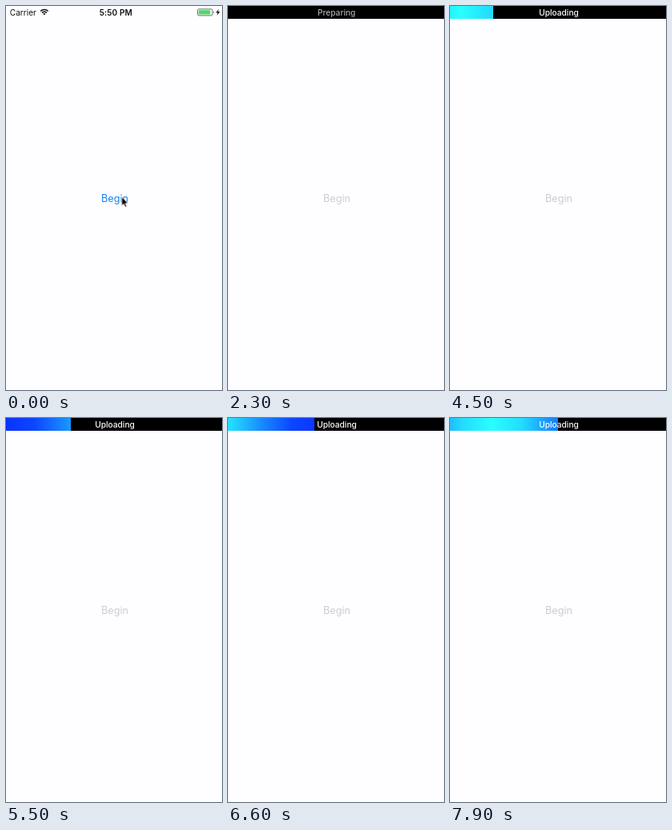
An HTML page for the animation above (8000 ms loop, 270 by 480 pixels).

```html
<!DOCTYPE html>
<html lang="en">
<head>
<meta charset="utf-8">
<title>Status bar progress</title>
<style>
  html, body { margin: 0; width: 100%; height: 100%; overflow: hidden; background: #fefdff; }
  .stage { position: relative; width: 270px; height: 480px; overflow: hidden; }
  svg { position: absolute; left: 0; top: 0; font-family: Inter, Roboto, sans-serif; }

  /* Every part shares one 8 s clock: 1% = 80 ms */
  .begin, .cursor, .strip, .fill, .label { animation: 8s linear infinite both; }

  .begin { font-size: 12.66px; text-anchor: middle; animation-name: disable; }
  .cursor { animation-name: leave; animation-timing-function: step-end; }

  .strip {
    position: absolute; left: 0; top: 0; width: 270px; height: 16px;
    overflow: hidden; background: #000;
    animation-name: drop; animation-timing-function: ease-in-out;
  }
  .fill {
    height: 100%;
    background: linear-gradient(90deg,
      rgb(40 255 255), rgb(35 220 255) 12.5%, rgb(23 139 255) 25%, rgb(13 70 255) 37.5%,
      rgb(10 50 255) 50%, rgb(13 70 255) 62.5%, rgb(23 139 255) 75%, rgb(35 220 255) 87.5%,
      rgb(40 255 255)) 0 0 / 300px 100%;
    animation-name: grow, shimmer;
    animation-timing-function: ease-in-out, linear;
  }
  .label { font-size: 10.2px; font-weight: 500; fill: #fff; text-anchor: middle; }
  .preparing { animation-name: preparing; }
  .uploading { animation-name: uploading; }

  @keyframes disable {
    0%, 1.1% { fill: #1684f2; }
    6.5%, 100% { fill: #cdcccf; }
  }
  @keyframes leave {
    0% { opacity: 1; }
    11.9%, 100% { opacity: 0; }
  }
  @keyframes drop {
    0%, 1.2% { transform: translateY(-17px); }
    7.2%, 100% { transform: none; }
  }
  @keyframes preparing {
    0%, 10.6% { opacity: 0; }
    13.7%, 27% { opacity: 1; }
    32.4%, 100% { opacity: 0; }
  }
  @keyframes uploading {
    0%, 34.3% { opacity: 0; }
    39%, 100% { opacity: 1; }
  }
  /* One tenth of the bar about every second, each move 250 ms */
  @keyframes grow {
    0%, 37.94% { width: 0; }
    41.06%, 50.56% { width: 27px; }
    53.69%, 63.2% { width: 54px; }
    66.33%, 75.84% { width: 81px; }
    78.96%, 88.46% { width: 108px; }
    91.59%, 100% { width: 135px; }
  }
  @keyframes shimmer {
    from { background-position-x: 756px; }
    to { background-position-x: -564px; }
  }
</style>
</head>
<body>
<div class="stage">
  <svg width="270" height="480" viewBox="0 0 270 480">
    <g font-size="10.1" fill="#111">
      <text x="4.8" y="11.6">Carrier</text>
      <text x="137.3" y="11.6" font-weight="600" letter-spacing=".1" text-anchor="middle">5:50 PM</text>
    </g>

    <g fill="none" stroke="#111" stroke-width="1.5">
      <path d="M43.1 6.5a6.8 6.8 0 0 1 9.6 0M44.9 8.4a4.2 4.2 0 0 1 6 0"/>
      <path d="M46.3 9.8a2.3 2.3 0 0 1 3.2 0L47.9 11.6Z" fill="#111" stroke="none"/>
    </g>

    <rect x="239.5" y="3.9" width="18.6" height="8" rx="1.6" fill="none" stroke="#444" stroke-width=".8"/>
    <rect x="240.8" y="5.2" width="14.6" height="5.4" rx=".6" fill="#4cd964"/>
    <path d="M259 6.4q1.4 1.5 0 3Z" fill="#444"/>
    <path d="M265.9 3.6L262.4 8.4H264.6L263.6 12L267.4 7.1H265Z" fill="#111"/>

    <text class="begin" x="136" y="244.6">Begin</text>
    <path class="cursor" transform="translate(144.6 238.4)"
      d="M0 0V11.4L2.6 9L4.4 13.1L6.4 12.2L4.6 8.2H8Z"
      fill="#000" stroke="#fff" stroke-width=".9" stroke-linejoin="round"/>
  </svg>

  <div class="strip">
    <div class="fill"></div>
    <svg width="270" height="16" viewBox="0 0 270 16">
      <text class="label preparing" x="135.7" y="11.5">Preparing</text>
      <text class="label uploading" x="136" y="11.5">Uploading</text>
    </svg>
  </div>
</div>
</body>
</html>
```
